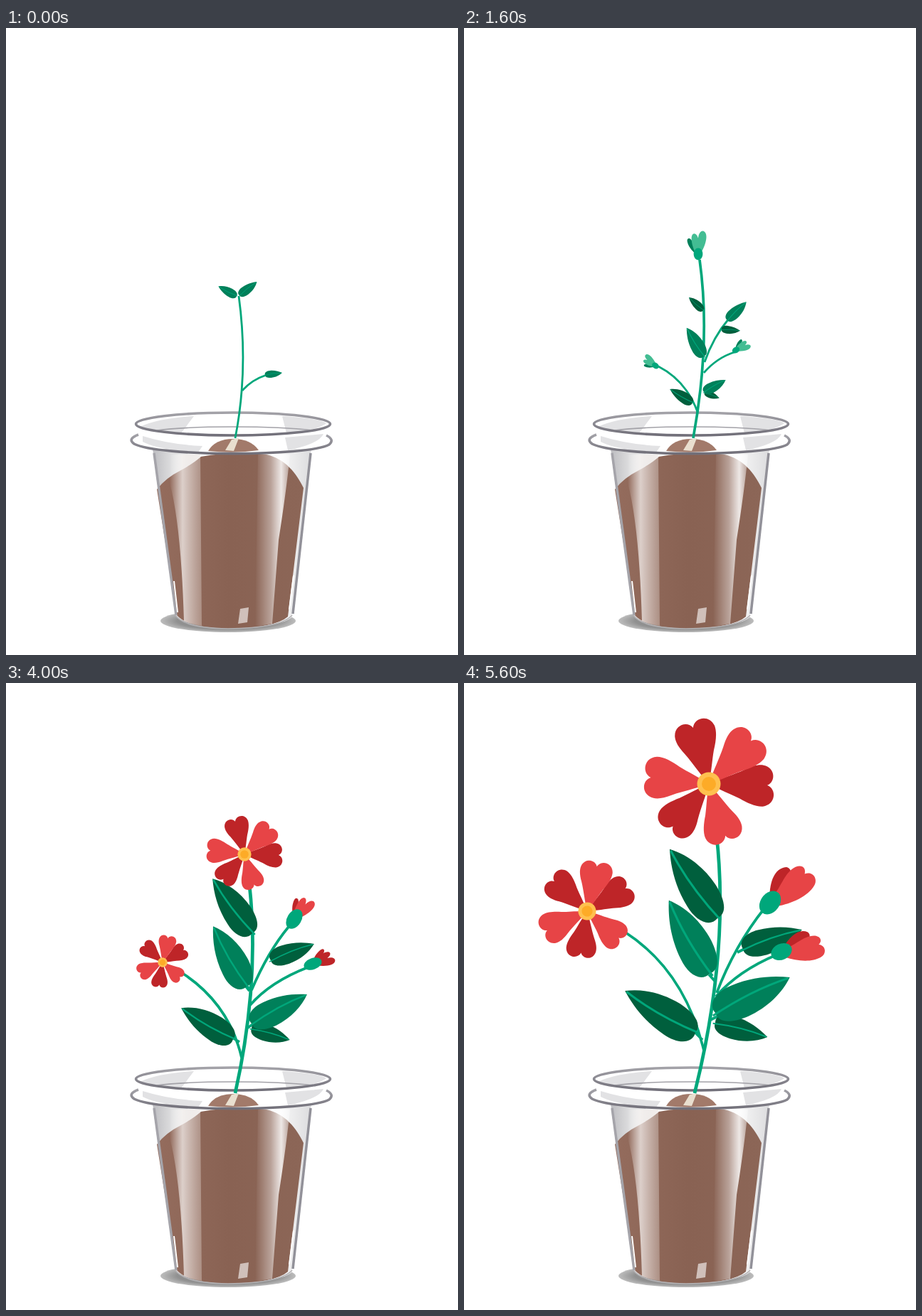
These frames come from a looping animation (635 by 882 pixels, 6400 ms). An HTML page without scripts:

```html
<!DOCTYPE html>
<html lang="en">
<head>
<meta charset="utf-8">
<title>Growing flower</title>
<style>
html, body { margin: 0; width: 100%; height: 100%; overflow: hidden; background: #fff; }
svg { display: block; width: 100%; height: 100%; }
.stage {
  --light: #e74446; --dark: #be2528;
  visibility: hidden;
  fill: #005f3d;
  animation: show 6.4s step-end calc(var(--i) * .8s - 6.4s) infinite;
}
@keyframes show { 0% { visibility: visible } 12.5% { visibility: hidden } }
.stem, .vein { fill: none; stroke: #00a77b; }
.stem { stroke-width: 3.7; }
.main { stroke-width: 4.8; }
.thin { stroke-width: 2.8; }
.vein { stroke-width: 2.6; }
.bright { fill: #00805a; }
.green { --light: #43bd93; --dark: #00805a; }
.deep { --light: #be2528; }
.light { fill: var(--light); }
.dark { fill: var(--dark); }
.calyx { fill: #00a77b; }
</style>
</head>
<body>
<svg viewBox="0 0 635 882">
<defs>
  <linearGradient id="shineL">
    <stop offset="0" stop-color="#fff" stop-opacity="0"/>
    <stop offset=".4" stop-color="#f6f2f0" stop-opacity=".75"/>
    <stop offset="1" stop-color="#e6ddd8" stop-opacity=".35"/>
  </linearGradient>
  <linearGradient id="shineR">
    <stop offset="0" stop-color="#fff" stop-opacity="0"/>
    <stop offset=".45" stop-color="#fff" stop-opacity=".4"/>
    <stop offset=".75" stop-color="#fff" stop-opacity=".85"/>
    <stop offset="1" stop-color="#fff" stop-opacity=".35"/>
  </linearGradient>
  <linearGradient id="glass">
    <stop offset="0" stop-color="#bcbcc0"/>
    <stop offset=".12" stop-color="#dededf"/>
    <stop offset=".3" stop-color="#fafafa"/>
    <stop offset=".8" stop-color="#f8f8f8"/>
    <stop offset="1" stop-color="#dcdcde"/>
  </linearGradient>
  <linearGradient id="soil">
    <stop offset="0" stop-color="#946c5d"/>
    <stop offset=".5" stop-color="#896253"/>
    <stop offset="1" stop-color="#8c6657"/>
  </linearGradient>
  <linearGradient id="rim" x2="0" y2="1">
    <stop offset="0" stop-color="#a3a2a8"/>
    <stop offset="1" stop-color="#716f79"/>
  </linearGradient>
  <radialGradient id="shadow">
    <stop offset=".75" stop-color="#909090"/>
    <stop offset="1" stop-color="#bdbdbd"/>
  </radialGradient>

  <!-- leaf: stalk at the origin, tip at x = 100 -->
  <g id="leaf">
    <path d="M0 0C-4-14 12-23 32-21.500C60-20 82-11 100 0C84 13 60 21.500 34 21C14 20-2 14 0 0z"/>
    <path class="vein" d="M-4 2Q50-6 98 0"/>
  </g>
  <path id="petal" d="M0 0C-9-18-14-34-22-50C-28-61-30-69-29-76C-26-93-6-94-1-82C4-96 26-95 29-77C30-67 25-55 19-44C13-31 9-18 0 0z"/>
  <g id="flower">
    <g class="dark">
      <use href="#petal" transform="rotate(-15)"/>
      <use href="#petal" transform="rotate(92)"/>
      <use href="#petal" transform="rotate(221) scale(.95)"/>
    </g>
    <g class="light">
      <use href="#petal" transform="rotate(45) scale(1.03)"/>
      <use href="#petal" transform="rotate(163) scale(.93)"/>
      <use href="#petal" transform="rotate(277)"/>
    </g>
    <circle r="16.500" fill="#ffc04f"/>
    <circle r="10" fill="#fdab27"/>
  </g>
  <!-- closed bud, pointing up -->
  <g id="bud">
    <path class="dark" d="M-3 0C-16-8-22-25-18-27C-13-30-7-20-3 0z"/>
    <path class="light" d="M-6-4C-14-22-13-36-7-36C-3-36-1-31 0-28C1-38 6-42 10-40C18-36 14-18 6-4z"/>
    <ellipse class="calyx" rx="8" ry="10.500"/>
  </g>
  <!-- opening bud, pointing right -->
  <g id="opening">
    <path class="dark" d="M4-8C16-26 32-40 48-32C55-26 50-14 30-2z"/>
    <path class="light" d="M4-5C24-8 40-27 60-25C70-23 73-16 66-9C79-7 79 8 69 13C52 22 26 18 6 10z"/>
    <ellipse class="calyx" rx="19" ry="14" transform="rotate(-22)"/>
  </g>
</defs>

<g id="cup">
  <ellipse cx="312" cy="834" rx="95" ry="16" fill="url(#shadow)"/>
  <path d="M206 592H429L402 828Q390 842 318 844Q250 842 238 826z" fill="url(#glass)"/>
  <path d="M212 649Q224 633 246 622Q264 612 274 603Q318 595 366 600C392 606 408 626 418 647L396 828Q378 844 312 845Q254 843 240 826z" fill="url(#soil)"/>
  <path d="M230 600H273L275 841Q258 838 250 834Q246 700 230 640z" fill="url(#shineL)"/>
  <path d="M354 600H399Q394 650 383 720L374 838L350 842z" fill="url(#shineR)"/>
  <path d="M329 817L341 815L339 836L326 838z" fill="#fff" opacity=".6"/>
  <path d="M182 557C184 534 454 534 456 557L450 578Q420 597 318 599Q210 597 186 578z" fill="#fff"/>
  <path d="M188 561Q214 549 264 546L246 570Q208 567 188 561zM388 546Q440 549 450 556Q438 566 394 570zM192 574Q230 586 276 588L270 597Q212 593 192 582zM392 576L446 571Q440 585 396 594z" fill="#e2e2e4"/>
  <path d="M284 595Q294 578 319 578Q344 578 355 594Q320 599 284 595z" fill="#a27a6a"/>
  <path d="M317 579L327 577L320 595L308 594z" fill="#e9dfcf"/>
  <g fill="none" stroke="#82808a">
    <path d="M212 566Q250 561 319 561Q390 561 430 566" stroke-width="1.600" stroke="#a3a2a8"/>
    <ellipse cx="319" cy="557" rx="136.500" ry="16" stroke-width="3.600" stroke="url(#rim)"/>
    <path d="M186 572Q170 578 180 585C214 603 424 603 454 586Q462 579 450 573" stroke-width="3.600" stroke="url(#rim)"/>
    <path d="M208 598L239 826" stroke="#a5a4aa" stroke-width="3.500"/>
    <path d="M428 598L403 824" stroke="#929199" stroke-width="3.500"/>
    <path d="M238 826Q250 844 312 845Q386 844 402 826" stroke="#b4b2b4" stroke-width="1.500"/>
    <path d="M236 778L241 822M404 770L398 818" stroke="#fff" stroke-width="2"/>
  </g>
</g>

<g class="stage" style="--i:0">
  <path class="stem thin" d="M322 577Q341 480 327 377"/>
  <path class="stem thin" d="M332 510Q345 495 366 488"/>
  <use href="#leaf" class="bright" transform="translate(324 377) rotate(-152) scale(.29)"/>
  <use href="#leaf" class="bright" transform="translate(328 376) rotate(-38) scale(.31)"/>
  <use href="#leaf" class="bright" transform="translate(364 488) rotate(-7) scale(.24)"/>
</g>

<g class="stage" style="--i:1">
  <path class="stem thin" d="M322 577Q346 450 331 316"/>
  <path class="stem thin" d="M328 540Q312 500 285 486M338 470Q348 440 366 418M337 485Q355 464 378 457"/>
  <use href="#leaf" transform="translate(329 317) rotate(-150) scale(.31)"/>
  <use href="#leaf" transform="translate(332 316) rotate(-43) scale(.33)"/>
  <use href="#leaf" transform="translate(337 458) rotate(-122) scale(.36)"/>
  <use href="#leaf" class="bright" transform="translate(365 419) rotate(-44) scale(.3)"/>
  <use href="#leaf" transform="translate(377 457) rotate(-15) scale(.24)"/>
  <use href="#leaf" transform="translate(286 487) rotate(-150) scale(.24)"/>
  <use href="#leaf" class="bright" transform="translate(336 513) rotate(-31) scale(.26)"/>
  <use href="#leaf" transform="translate(321 527) rotate(-149) scale(.28)"/>
</g>

<g class="stage" style="--i:2">
  <path class="stem" d="M322 577Q347 440 331 326"/>
  <path class="stem thin" d="M328 540Q312 496 273 476M338 470Q350 435 372 409M337 485Q355 464 380 456"/>
  <use href="#leaf" transform="translate(336 397) rotate(-138) scale(.27)"/>
  <use href="#leaf" class="bright" transform="translate(337 462) rotate(-121) scale(.47)"/>
  <use href="#leaf" class="bright" transform="translate(370 411) rotate(-44) scale(.37)"/>
  <use href="#leaf" transform="translate(362 424) rotate(4) scale(.26)"/>
  <use href="#leaf" transform="translate(338 513) rotate(20) scale(.22)"/>
  <use href="#leaf" class="bright" transform="translate(337 512) rotate(-29) scale(.35)"/>
  <use href="#leaf" transform="translate(321 527) rotate(-149) scale(.37)"/>
  <g class="green">
    <use href="#bud" transform="translate(329 318) scale(.8)"/>
    <use href="#bud" transform="translate(382 453) rotate(62) scale(.52)"/>
    <use href="#bud" transform="translate(269 475) rotate(-55) scale(.5)"/>
  </g>
</g>

<g class="stage" style="--i:3">
  <path class="stem main" d="M322 577Q358 420 338 264"/>
  <path class="stem" d="M330 525Q308 448 240 414M343 437Q366 380 392 348M343 453Q370 418 418 402M341 433L334 423M328 505L320 500"/>
  <use href="#leaf" transform="translate(345 354) rotate(-125) scale(.7)"/>
  <use href="#leaf" class="bright" transform="translate(338 429) rotate(-117.500) scale(.69)"/>
  <use href="#leaf" class="bright" transform="translate(390 349) rotate(-44) scale(.54)"/>
  <use href="#leaf" transform="translate(369 391) rotate(-20) scale(.5)"/>
  <use href="#leaf" class="bright" transform="translate(417 404) rotate(-9) scale(.59)"/>
  <use href="#leaf" transform="translate(341 484) rotate(16) scale(.4)"/>
  <use href="#leaf" class="bright" transform="translate(341 480) rotate(-26) scale(.59)"/>
  <use href="#leaf" transform="translate(320 501) rotate(-150) scale(.61)"/>
  <use href="#bud" transform="translate(335 257)"/>
  <use href="#bud" transform="translate(237 413) rotate(-42) scale(.78)"/>
</g>

<g class="stage" style="--i:4">
  <path class="stem main" d="M322 577Q358 420 338 264"/>
  <path class="stem" d="M330 525Q310 448 240 412M344 434Q366 380 393 347M343 453Q370 418 420 402M341 433L334 423M328 505L320 500"/>
  <use href="#leaf" transform="translate(346 352) rotate(-125) scale(.82)"/>
  <use href="#leaf" class="bright" transform="translate(338 428) rotate(-118.500) scale(.83)"/>
  <use href="#leaf" class="bright" transform="translate(390 349) rotate(-44) scale(.6)"/>
  <use href="#leaf" transform="translate(370 390) rotate(-20) scale(.57)"/>
  <use href="#leaf" class="bright" transform="translate(417 404) rotate(-9) scale(.67)"/>
  <use href="#leaf" transform="translate(343 485) rotate(16) scale(.48)"/>
  <use href="#leaf" class="bright" transform="translate(343 480) rotate(-27) scale(.74)"/>
  <use href="#leaf" transform="translate(319 501) rotate(-149) scale(.73)"/>
  <use href="#opening" transform="translate(337 262) rotate(-90) scale(.7)"/>
  <use href="#opening" transform="translate(236 411) rotate(-136) scale(.52)"/>
</g>

<g class="stage" style="--i:5">
  <path class="stem main" d="M322 577Q357 420 342 284"/>
  <path class="stem" d="M331 527Q313 450 246 407M345 432Q368 378 397 343M343 453Q372 420 424 400M342 433L334 423M328 505L318 499M338 486L347 480"/>
  <use href="#leaf" transform="translate(346 352) rotate(-126) scale(.95)"/>
  <use href="#leaf" class="bright" transform="translate(338 427) rotate(-119) scale(.97)"/>
  <use href="#leaf" transform="translate(372 390) rotate(-20.700) scale(.65)"/>
  <use href="#leaf" transform="translate(345 486) rotate(16.500) scale(.56)"/>
  <use href="#leaf" class="bright" transform="translate(345 479) rotate(-27.700) scale(.88)"/>
  <use href="#leaf" transform="translate(319 501) rotate(-149) scale(.85)"/>
  <use href="#bud" transform="translate(406 330) rotate(38) scale(.84)"/>
  <ellipse class="calyx" rx="10" ry="15" transform="translate(405 332) rotate(32)"/>
  <g class="deep"><use href="#bud" transform="translate(432 394) rotate(70) scale(.74)"/></g>
  <ellipse class="calyx" rx="13" ry="8" transform="translate(431 395) rotate(-20)"/>
  <use href="#flower" transform="translate(335 241) scale(.585)"/>
  <use href="#flower" transform="translate(220 393) rotate(-32) scale(.41)"/>
</g>

<g class="stage" style="--i:6">
  <path class="stem main" d="M324 577Q368 390 350 224"/>
  <path class="stem" d="M335 517Q304 415 220 361M350 432Q374 372 404 338M350 453Q382 416 432 397M349 432L340 422M332 505L322 499M343 485L354 480M372 392L384 386"/>
  <use href="#leaf" transform="translate(355 350) rotate(-125) scale(1.11)"/>
  <use href="#leaf" class="bright" transform="translate(343 424) rotate(-119) scale(1.12)"/>
  <use href="#leaf" transform="translate(379 388) rotate(-18.700) scale(.81)"/>
  <use href="#leaf" transform="translate(349 489) rotate(14.600) scale(.71)"/>
  <use href="#leaf" class="bright" transform="translate(350 478) rotate(-26.600) scale(1.1)"/>
  <use href="#leaf" transform="translate(322 501) rotate(-149) scale(1.07)"/>
  <use href="#opening" transform="translate(409 333) rotate(-32) scale(.7)"/>
  <use href="#opening" transform="translate(437 394) rotate(-6) scale(.7)"/>
  <use href="#flower" transform="translate(342 172) scale(.7)"/>
  <use href="#flower" transform="translate(180 341) rotate(-32) scale(.56)"/>
</g>

<g class="stage" style="--i:7">
  <path class="stem main" d="M324 577Q373 380 355 216"/>
  <path class="stem" d="M337 517Q310 405 227 351M355 436Q380 370 422 317M354 441Q385 405 440 382M353 420L344 410M335 502L324 491M346 474L358 468M384 379L398 372"/>
  <use href="#leaf" transform="translate(356 331) rotate(-124.600) scale(1.18)"/>
  <use href="#leaf" class="bright" transform="translate(345 409) rotate(-119) scale(1.18)"/>
  <use href="#leaf" transform="translate(392 374) rotate(-18) scale(.87)"/>
  <use href="#leaf" transform="translate(353 478) rotate(15.300) scale(.76)"/>
  <use href="#leaf" class="bright" transform="translate(353 464) rotate(-25.500) scale(1.16)"/>
  <use href="#leaf" transform="translate(325 492) rotate(-149.200) scale(1.15)"/>
  <use href="#opening" transform="translate(430 309) rotate(-32) scale(.95)"/>
  <use href="#opening" transform="translate(446 378) rotate(-3) scale(.8)"/>
  <use href="#flower" transform="translate(344 142)"/>
  <use href="#flower" transform="translate(173 321) rotate(-32) scale(.76)"/>
</g>
</svg>
</body>
</html>
```
